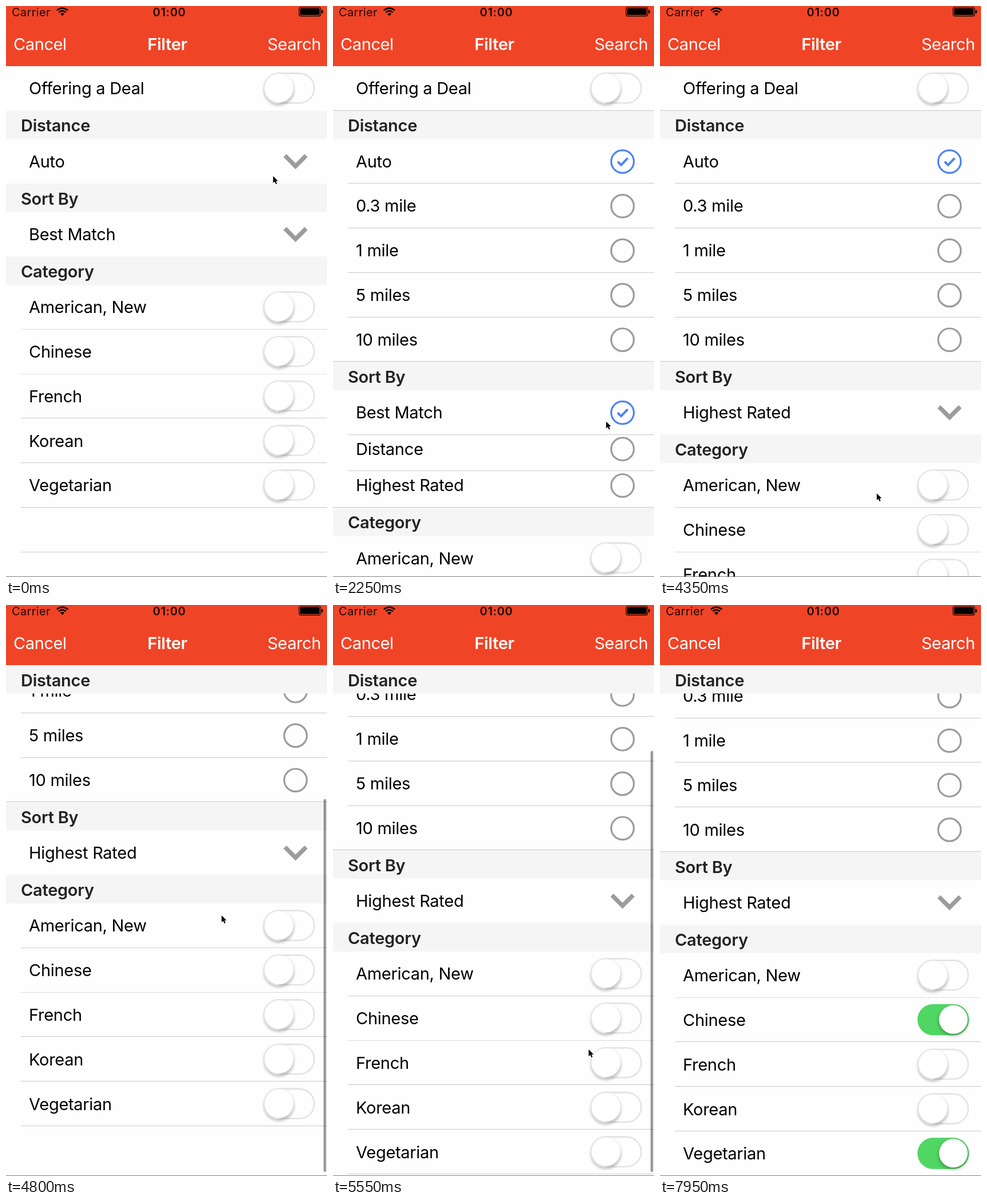
These frames come from a looping animation (561x997 px, 8 s). An HTML page with a canvas:

```html
<!DOCTYPE html>
<html lang="en">
<head>
<meta charset="utf-8">
<title>Filter</title>
<style>
html, body { margin: 0; width: 100%; height: 100%; overflow: hidden; background: #fefefe; }
canvas { display: block; }
</style>
</head>
<body>
<canvas id="stage" width="561" height="997"></canvas>
<script>
const ctx = document.getElementById('stage').getContext('2d');
const W = 561, H = 997, LOOP = 8000, STEP = 150;
const NAV = 105, ROW = 77.8, HEAD = 49.5, MAX_SCROLL = 190.3;
const RED = '#f04427', PAGE = '#fefefe', GREY = '#9c9c9c', BLUE = '#4f83f7', RULE = '#c8c7cc';
const FONT = 'Inter, Roboto, sans-serif';

const distances = ['Auto', '0.3 mile', '1 mile', '5 miles', '10 miles'];
const sorts = ['Best Match', 'Distance', 'Highest Rated'];
const cuisines = ['American, New', 'Chinese', 'French', 'Korean', 'Vegetarian'];

// time, x, y
const pointer = [
  [0, 466, 296], [300, 467, 299], [600, 476, 328], [1050, 488, 367],
  [1200, 488, 420], [1350, 484, 545], [1650, 474, 707], [2100, 475, 709],
  [2400, 478, 740], [2700, 493, 840], [3000, 501, 880], [3450, 501, 880],
  [3750, 480, 872], [4350, 378, 850], [4500, 376, 800], [4650, 376, 640],
  [4800, 376, 541], [4950, 382, 548], [5250, 420, 680], [5550, 446, 775],
  [5850, 486, 724], [6450, 492, 716], [6600, 491, 866], [6900, 528, 905],
  [7350, 512, 950], [8000, 512, 950]
];
// time, offset
const scroll = [
  [4350, 0], [4500, 50], [4650, 195], [4800, 277], [4950, 278], [5100, 248],
  [5250, 218], [5400, 200], [5550, 193], [5700, 191], [5850, MAX_SCROLL]
];

const clamp = v => Math.max(0, Math.min(1, v));
const ease = (t, start, len) => {
  const p = clamp((t - start) / len);
  return p * p * (3 - 2 * p);
};

function track(keys, t, col) {
  if (t <= keys[0][0]) return keys[0][col];
  for (let i = 1; i < keys.length; i++) {
    const a = keys[i - 1], b = keys[i];
    if (t <= b[0]) return a[col] + (b[col] - a[col]) * (t - a[0]) / (b[0] - a[0]);
  }
  return keys[keys.length - 1][col];
}

function rect(x, y, w, h, color) {
  ctx.fillStyle = color;
  ctx.fillRect(x, y, w, h);
}

function pill(x, y, w, h, r) {
  ctx.beginPath();
  ctx.roundRect(x, y, w, h, r);
}

function disc(x, y, r) {
  ctx.beginPath();
  ctx.arc(x, y, r, 0, Math.PI * 2);
}

function poly(points, color, width) {
  ctx.beginPath();
  points.forEach(([x, y]) => ctx.lineTo(x, y));
  ctx.strokeStyle = color;
  ctx.lineWidth = width;
  ctx.stroke();
}

function text(str, x, y, { size = 29, weight = 400, color = '#000', align = 'left', gap = -0.28 } = {}) {
  ctx.font = `${weight} ${size}px ${FONT}`;
  ctx.letterSpacing = gap + 'px';
  ctx.textAlign = align;
  ctx.fillStyle = color;
  ctx.fillText(str, x, y);
}

function rule(bottom, x) {
  rect(x, Math.round(bottom) - 1, W - x, 1, RULE);
}

function chevron(y) {
  poly([[487.5, y - 10], [506, y + 8.5], [524.5, y - 10]], GREY, 7.5);
}

function radio(y, checked) {
  ctx.strokeStyle = checked ? BLUE : GREY;
  ctx.lineWidth = 3.2;
  disc(506, y, 19.8);
  ctx.stroke();
  if (checked) poly([[497.5, y], [503.5, y + 6], [515, y - 6]], BLUE, 4);
}

function toggle(y, on) {
  ctx.lineWidth = 2.6;
  ctx.strokeStyle = '#e4e4e4';
  pill(451.3, y - 25.9, 87.4, 51.8, 25.9);
  ctx.stroke();
  if (on > 0) {
    ctx.globalAlpha = on;
    ctx.fillStyle = '#50d662';
    pill(450, y - 27.2, 90, 54.4, 27.2);
    ctx.fill();
    ctx.globalAlpha = 1;
  }
  const x = 477 + 35.7 * on;
  ctx.save();
  ctx.fillStyle = '#fff';
  ctx.shadowColor = 'rgba(0,0,0,.06)';
  ctx.shadowOffsetY = 5;
  ctx.shadowBlur = 3;
  disc(x, y, 27);
  if (on < 0.5) ctx.fill();
  ctx.shadowColor = 'rgba(0,0,0,.32)';
  ctx.shadowOffsetY = 3;
  ctx.shadowBlur = 6;
  disc(x, y - 0.3, 25);
  ctx.fill();
  ctx.restore();
  if (on < 0.5) {
    ctx.lineWidth = 2.6;
    ctx.strokeStyle = '#e4e4e4';
    ctx.beginPath();
    ctx.arc(477.2, y, 25.9, Math.PI / 2, Math.PI * 1.5);
    ctx.lineTo(512.8, y - 25.9);
    ctx.stroke();
    ctx.fillStyle = '#fff';
    disc(x, y - 0.3, 25);
    ctx.fill();
  }
}

function row(y, label, control) {
  rect(0, y, W, ROW, PAGE);
  text(label, 40, y + 49.3);
  control(y + ROW / 2);
}

// Rows slide out from under the first one as the section opens.
function picker(y, labels, open, current) {
  const last = labels.length - 1;
  if (open > 0) {
    for (let i = last; i > 0; i--) {
      const top = y + i * ROW * open;
      row(top, labels[i], c => radio(c + 0.4, false));
      if (i < last) rule(top + ROW, 26);
    }
  }
  const expanded = open > 0 && current === labels[0];
  row(y, current, c => expanded ? radio(c + 0.4, true) : chevron(c));
  if (expanded) rule(y + ROW, 26);
  return y + ROW * (1 + last * open);
}

function header(y, label, line) {
  rect(0, y, W, HEAD, '#f5f5f5');
  if (line) rule(y, 0);
  text(label, 26, y + 36.5, { weight: 600, color: '#222' });
}

function table(t) {
  const offset = track(scroll, t, 1);
  const distOpen = ease(t, 60, 330);
  const closing = ease(t, 3360, 300);
  const sortOpen = ease(t, 2010, 330) * (1 - closing);
  const picked = t >= 3450 ? sorts[2] : sorts[0];

  let y = NAV - offset;
  row(y, 'Offering a Deal', c => toggle(c - 0.4, 0));
  const distTop = y += ROW;
  const sortTop = y = picker(y + HEAD, distances, distOpen, distances[0]);
  const catTop = y = picker(y + HEAD, sorts, sortOpen, picked);
  y += HEAD;
  cuisines.forEach((name, i) => {
    const on = i === 1 ? ease(t, 6200, 350) : i === 4 ? ease(t, 7400, 350) : 0;
    row(y, name, c => toggle(c - 0.4, on));
    y += ROW;
    rule(y, 26);
  });
  if (offset === 0) for (y += ROW; y < H; y += ROW) rule(y, 26);

  header(catTop, 'Category', distOpen > 0 && closing < 1);
  header(sortTop, 'Sort By', t >= 2100);
  header(Math.min(Math.max(NAV, distTop), sortTop - HEAD), 'Distance', distOpen > 0);
  scrollbar(t, offset);
}

function scrollbar(t, offset) {
  const alpha = clamp((t - 4350) / 150) * (1 - clamp((t - 5850) / 300));
  if (alpha <= 0) return;
  const over = Math.max(0, offset - MAX_SCROLL);
  const len = 738 - over;
  const end = 990 - 145 * (1 - Math.min(1, offset / MAX_SCROLL));
  ctx.fillStyle = `rgba(0,0,0,${0.4 * alpha})`;
  pill(555, end - len, 4.5, len, 2.25);
  ctx.fill();
}

function navBar() {
  rect(0, 0, W, NAV, RED);
  const ink = '#1c0805';
  text('Carrier', 10, 18, { size: 20, color: ink, gap: 0.35 });
  text('01:00', 285.5, 18, { size: 20, weight: 600, color: ink, align: 'center', gap: 0.7 });

  ctx.strokeStyle = ctx.fillStyle = '#000';
  ctx.lineWidth = 2.7;
  for (const r of [8.3, 13]) {
    ctx.beginPath();
    ctx.arc(98.5, 16.8, r, -Math.PI * 0.76, -Math.PI * 0.24);
    ctx.stroke();
  }
  ctx.beginPath();
  ctx.moveTo(98.5, 17.5);
  ctx.arc(98.5, 16.8, 4.8, -Math.PI * 0.76, -Math.PI * 0.24);
  ctx.fill();

  ctx.lineWidth = 1.2;
  pill(512.2, 2, 37.6, 15.6, 3);
  ctx.stroke();
  pill(514, 3.8, 34, 12, 1.5);
  ctx.fill();
  pill(551.3, 7, 2.5, 6, 1.2);
  ctx.fill();

  const white = { color: '#fff', gap: -0.4 };
  text('Cancel', 13, 77, white);
  text('Filter', 282, 77, { color: '#fff', weight: 600, align: 'center' });
  text('Search', 550.5, 77, { ...white, align: 'right' });
}

function cursor(t) {
  if (t >= 7950) return;
  ctx.save();
  ctx.translate(track(pointer, t, 1) + 0.8, track(pointer, t, 2) + 1);
  ctx.beginPath();
  [[0, 0], [0, 12], [2.8, 9.5], [4.8, 14], [6.8, 13.1], [4.9, 8.8], [8.6, 8.6]]
    .forEach(([x, y]) => ctx.lineTo(x, y));
  ctx.closePath();
  ctx.lineJoin = 'round';
  ctx.lineWidth = 1.8;
  ctx.strokeStyle = '#fff';
  ctx.stroke();
  ctx.fillStyle = '#000';
  ctx.fill();
  ctx.restore();
}

function draw(now) {
  const t = Math.floor((now % LOOP) / STEP) * STEP;
  rect(0, 0, W, H, PAGE);
  table(t);
  navBar();
  rect(0, H - 1, W, 1, '#808080');
  cursor(t);
}

const start = performance.now();
function tick() {
  draw(performance.now() - start);
  requestAnimationFrame(tick);
}
tick();
</script>
</body>
</html>
```
